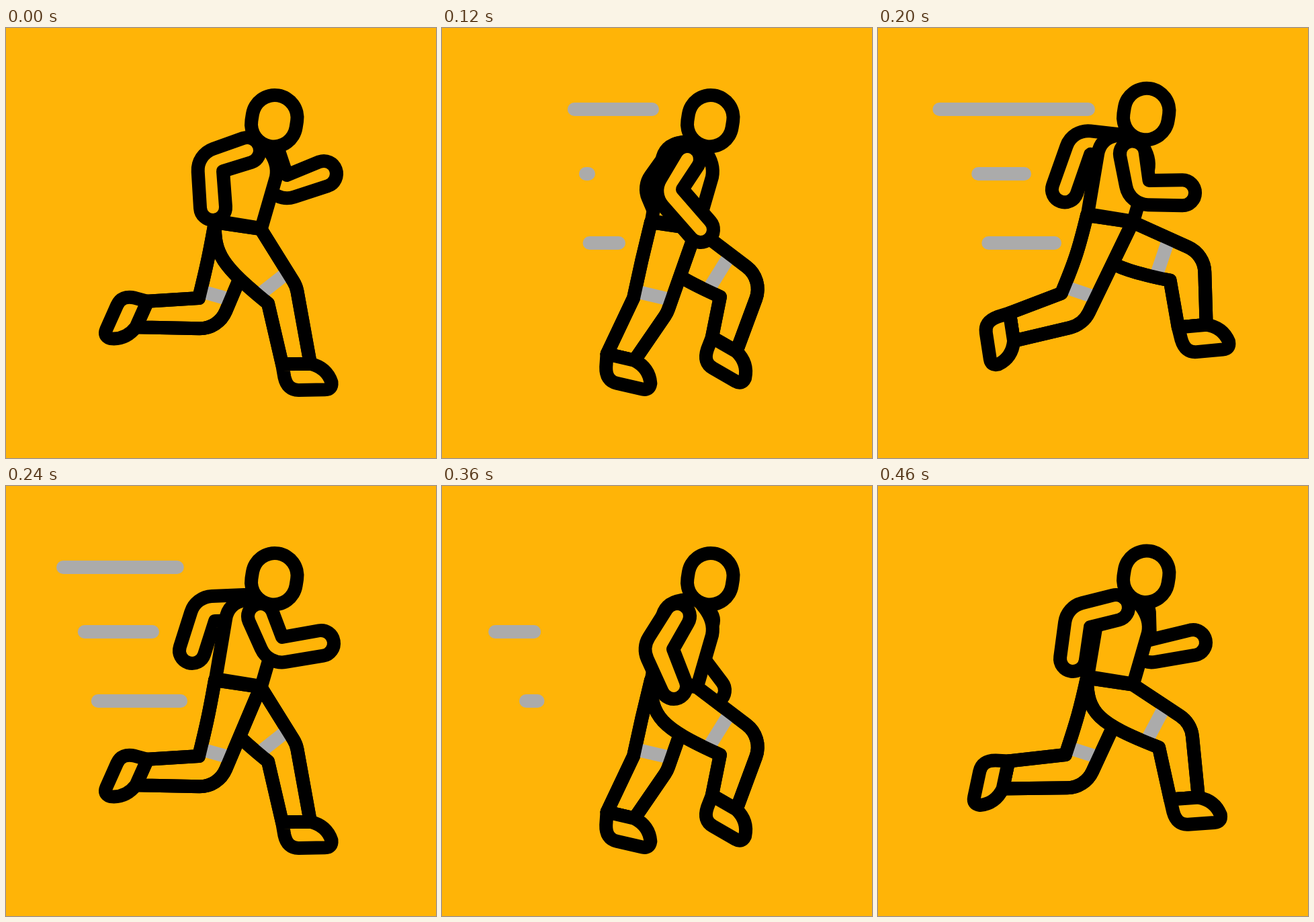
An HTML page with a canvas that plays this animation: 640 px wide and 640 px high, repeating every 480 ms.

```html
<!DOCTYPE html>
<html lang="en">
<head>
<meta charset="utf-8">
<title>Runner</title>
<style>
html, body { margin: 0; height: 100%; overflow: hidden; background: #ffb407; }
canvas { display: block; }
</style>
</head>
<body>
<canvas id="stage" width="640" height="640"></canvas>
<script>
const ctx = document.getElementById('stage').getContext('2d');
const LOOP = 480, STEP = 20, WIDTH = 20;
const YELLOW = '#ffb407', BLACK = '#000', GRAY = '#ababab';

// Rows: time, then values.
const BOB = [[0, 0], [60, 7.5], [120, 0], [160, -13], [180, -15], [220, -3.5]];

// Rows: time, seat x y, inner knee x y, kneecap x y, ankle x y, foot angle
const LEG = [
  [0, 309, 344, 390, 410, 432, 384, 432, 500, -1],
  [60, 307, 358, 374, 428, 422, 415, 383, 500, 0],
  [120, 297, 345, 285, 402, 335, 424, 266, 490, 13],
  [160, 292, 345, 270, 387, 313, 420, 244, 483, 34],
  [220, 299, 340, 279, 400, 308, 449, 190, 430, 102],
  [240, 301, 345, 287, 402, 316, 448, 202, 426, 114],
  [300, 316, 348, 341, 406, 400, 442, 269, 440, 106],
  [360, 310, 353, 414, 400, 478, 374, 420, 471, 30],
  [400, 325, 358, 439, 372, 493, 340, 460, 437, 2],
  [460, 311, 347, 418, 389, 466, 353, 456, 465, -4]
];

// Rows: time, shoulder x y, inner elbow x y, hand x y
const NEAR_ARM = [
  [0, 359, 182, 323, 213, 308, 267],
  [60, 355, 194, 338, 239, 327, 293],
  [120, 365, 195, 358, 240, 385, 300],
  [160, 375, 186, 385, 234, 420, 273],
  [240, 379, 194, 411, 225, 469, 234],
  [300, 376, 204, 397, 243, 434, 278],
  [360, 350, 194, 344, 243, 345, 298],
  [460, 354, 181, 316, 210, 290, 257]
];
const FAR_ARM = [
  [0, 385, 180, 418, 219, 473, 217],
  [60, 385, 195, 400, 243, 438, 270],
  [120, 355, 190, 345, 240, 345, 295],
  [160, 352, 178, 328, 195, 296, 257],
  [240, 355, 181, 311, 201, 277, 245],
  [300, 352, 190, 318, 228, 284, 292],
  [360, 385, 200, 385, 250, 402, 304],
  [460, 385, 190, 405, 229, 469, 233]
];

// Rows: y, left end, right end, grow start, grow speed, shrink start, shrink speed
const BARS = [
  [121, 85, 313, 32, 1.32, 208, 1.82],
  [217, 79, 218, 115, 0.81, 283, 1.05],
  [320, 125, 263, 57, 0.69, 237, 0.98]
];

// Smooth periodic interpolation through unevenly spaced keys.
function sample(keys, time) {
  const t = time % LOOP, n = keys.length;
  const at = i => {
    const turn = Math.floor(i / n), key = keys[i - turn * n];
    return [key[0] + turn * LOOP, ...key.slice(1)];
  };
  let i = n - 1;
  while (keys[i][0] > t) i--;
  const [a, b, c, d] = [at(i - 1), at(i), at(i + 1), at(i + 2)];
  const before = b[0] - a[0], span = c[0] - b[0], after = d[0] - c[0];
  const u = (t - b[0]) / span, u2 = u * u, u3 = u2 * u;
  return b.slice(1).map((p, k) => {
    const q = c[k + 1];
    const slope = (q - p) / span;
    const inSlope = (p - a[k + 1]) / before, outSlope = (d[k + 1] - q) / after;
    const m0 = (span * inSlope + before * slope) / (before + span);
    const m1 = (after * slope + span * outSlope) / (span + after);
    return (2 * u3 - 3 * u2 + 1) * p + (3 * u2 - 2 * u3) * q
      + span * ((u3 - 2 * u2 + u) * m0 + (u3 - u2) * m1);
  });
}

const mix = (a, b, u) => a + (b - a) * u;

function paint() {
  ctx.fillStyle = YELLOW;
  ctx.fill();
  outline();
}

function outline() {
  ctx.strokeStyle = BLACK;
  ctx.lineWidth = WIDTH;
  ctx.stroke();
}

function line(color, width, x1, y1, x2, y2) {
  ctx.beginPath();
  ctx.moveTo(x1, y1);
  ctx.lineTo(x2, y2);
  ctx.strokeStyle = color;
  ctx.lineWidth = width;
  ctx.stroke();
}

function foot(x, y, angle) {
  ctx.save();
  ctx.translate(x, y);
  ctx.rotate(angle);
  ctx.beginPath();
  ctx.moveTo(-21, 0);
  ctx.lineTo(21, 0);
  ctx.quadraticCurveTo(45, 6, 52, 28);
  ctx.quadraticCurveTo(53, 39, 42, 39);
  ctx.lineTo(3, 39);
  ctx.quadraticCurveTo(-14, 39, -18, 19);
  ctx.closePath();
  paint();
  ctx.restore();
}

function leg(time, bob) {
  const [cx, cy, kx, ky, px, py, fx, fy, degrees] = sample(LEG, time);
  const angle = degrees * Math.PI / 180;
  const ax = 21 * Math.cos(angle), ay = 21 * Math.sin(angle);
  const rearX = 311, rearY = 289 + bob, hipX = 379, hipY = 299 + bob;
  const shape = () => {
    ctx.beginPath();
    ctx.moveTo(rearX, rearY);
    ctx.bezierCurveTo(mix(rearX, cx, .85), mix(rearY, cy, .85),
      mix(kx, cx, .85), mix(ky, cy, .85), kx, ky);
    ctx.lineTo(fx - ax, fy - ay);
    ctx.lineTo(fx + ax, fy + ay);
    ctx.arcTo(px, py, hipX, hipY, 42);
    ctx.lineTo(hipX, hipY);
    ctx.closePath();
  };
  shape();
  paint();

  // The hem crosses the thigh at a right angle to its front edge.
  const bx = mix(cx, kx, .82), by = mix(cy, ky, .82);
  const length = Math.hypot(px - hipX, py - hipY);
  const dx = (px - hipX) / length, dy = (py - hipY) / length;
  const reach = (bx - hipX) * dx + (by - hipY) * dy - 6;
  ctx.lineCap = 'butt';
  line(GRAY, WIDTH, bx, by, hipX + dx * reach, hipY + dy * reach);
  ctx.lineCap = 'round';
  shape();
  outline();
  foot(fx, fy, angle);
}

function arm(keys, time) {
  const [sx, sy, ex, ey, hx, hy] = sample(keys, time);
  const r = 19, quarter = Math.PI / 2;
  const up = Math.atan2(sy - ey, sx - ex), down = Math.atan2(hy - ey, hx - ex);
  let bx = Math.cos(up) + Math.cos(down), by = Math.sin(up) + Math.sin(down);
  const size = Math.hypot(bx, by) || 1;
  const ox = ex - 46 * bx / size, oy = ey - 46 * by / size;
  const mx = (ox + ex) / 2, my = (oy + ey) / 2;
  const a = Math.atan2(sy - my, sx - mx), b = Math.atan2(hy - my, hx - mx);
  const startX = sx + r * Math.cos(a - quarter), startY = sy + r * Math.sin(a - quarter);
  ctx.beginPath();
  ctx.arc(sx, sy, r, a - quarter, a + quarter);
  ctx.lineTo(ex, ey);
  ctx.arc(hx, hy, r, b - quarter, b + quarter);
  ctx.arcTo(ox, oy, startX, startY, 34);
  ctx.closePath();
  paint();
}

function torso(bob) {
  ctx.save();
  ctx.translate(0, bob);
  ctx.beginPath();
  ctx.moveTo(312, 287);
  ctx.lineTo(380, 298);
  ctx.lineTo(402, 222);
  ctx.quadraticCurveTo(406, 202, 391, 182);
  ctx.lineTo(380, 168);
  ctx.lineTo(356, 170);
  ctx.quadraticCurveTo(331, 174, 327, 198);
  ctx.closePath();
  paint();
  ctx.restore();
}

function head(bob) {
  line(BLACK, 87, 400, 133.5 + bob, 398.5, 143 + bob);
  line(YELLOW, 47, 400, 133.5 + bob, 398.5, 143 + bob);
}

function bar(t, [y, x0, x1, growAt, growSpeed, shrinkAt, shrinkSpeed]) {
  const left = Math.max(x0, x1 - Math.max(0, t - growAt) * growSpeed);
  const right = x1 - Math.max(0, t - shrinkAt) * shrinkSpeed;
  if (right > left) line(GRAY, WIDTH, left, y, right, y);
}

function draw(t) {
  const [bob] = sample(BOB.map(([at, y]) => [at, y])
    .concat(BOB.map(([at, y]) => [at + LOOP / 2, y])), t);
  ctx.fillStyle = YELLOW;
  ctx.fillRect(0, 0, 640, 640);
  ctx.lineCap = ctx.lineJoin = 'round';
  BARS.forEach(b => bar(t, b));
  arm(FAR_ARM, t);
  leg(t + LOOP / 2, bob);
  leg(t, bob);
  torso(bob);
  arm(NEAR_ARM, t);
  head(bob);
}

function tick() {
  draw(Math.floor(performance.now() / STEP) * STEP % LOOP);
  requestAnimationFrame(tick);
}
tick();
</script>
</body>
</html>
```
